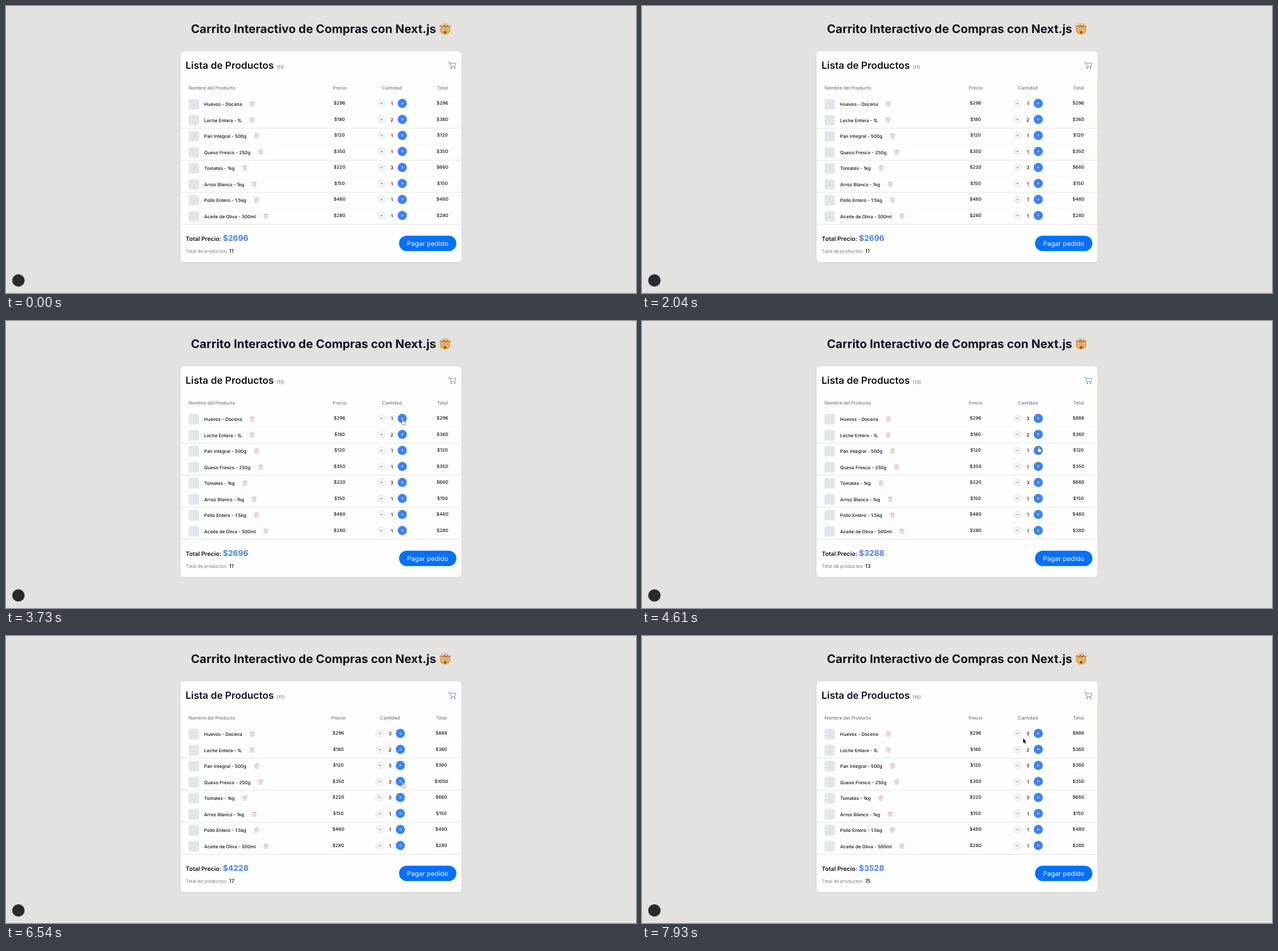
An HTML page with a canvas for the animation above (8 s loop, 1000x457 px).

```html
<!DOCTYPE html>
<html lang="es">
<head>
<meta charset="utf-8">
<title>Carrito</title>
<style>
html, body { margin: 0; width: 100%; height: 100%; overflow: hidden; background: #e3e2e1; }
canvas { display: block; width: 1000px; height: 457px; }
</style>
</head>
<body>
<canvas id="stage"></canvas>
<script>
const W = 1000, H = 457, LOOP = 8000;
const S = W / 1920; // page pixels to stage pixels
const BLUE = '#3b82f6', INK = '#11121f', GRAY = '#737986';
const LEFT = 277, TOP = 72, WIDTH = 446, HEIGHT = 336;
const STEP = 16.5; // from a quantity to its buttons
const BTN = 14 * S;

const dpr = window.devicePixelRatio || 1;
const cv = document.getElementById('stage');
const c = cv.getContext('2d');
cv.width = W * dpr;
cv.height = H * dpr;

const items = [
  { name: 'Huevos - Docena', price: 296, qty: 1 },
  { name: 'Leche Entera - 1L', price: 180, qty: 2 },
  { name: 'Pan Integral - 500g', price: 120, qty: 1 },
  { name: 'Queso Fresco - 250g', price: 350, qty: 1 },
  { name: 'Tomates - 1kg', price: 220, qty: 3 },
  { name: 'Arroz Blanco - 1kg', price: 150, qty: 1 },
  { name: 'Pollo Entero - 1.5kg', price: 480, qty: 1 },
  { name: 'Aceite de Oliva - 500ml', price: 280, qty: 1 }
];
const rowY = i => 155.1 + 25.5 * i;

// Each visit glides to a button, waits, then clicks it twice.
const WAIT = 190, GAP = 240;
const visits = [
  { row: 0, sign: 1, at: 3820, glide: 660 },
  { row: 2, sign: 1, at: 5010, glide: 400 },
  { row: 3, sign: 1, at: 5900, glide: 150 },
  { row: 3, sign: -1, at: 7120, glide: 390 }
];

const move = (start, end, x, y) => ({ start, end, x, y });
const moves = [
  move(630, 1400, 318, 39),
  move(1520, 1900, 327, 37),
  move(2040, 2810, 691.5, 48.5),
  ...visits.map(v => move(v.at - WAIT - v.glide, v.at - WAIT, 612.5 + STEP * v.sign, rowY(v.row) + 2)),
  move(7570, 7930, 605, 163)
];

function cursorAt(t) {
  let x = 330, y = -12;
  for (const m of moves) {
    const k = Math.min(1, Math.max(0, (t - m.start) / (m.end - m.start)));
    const e = 1 - (1 - k) ** 3;
    x += (m.x - x) * e;
    y += (m.y - y) * e;
  }
  return { x, y };
}

function quantities(t) {
  const qty = items.map(it => it.qty);
  for (const v of visits)
    for (const at of [v.at, v.at + GAP]) if (t >= at) qty[v.row] += v.sign;
  return qty;
}

function text(str, x, y, px, weight, color, align = 'left') {
  c.font = `${weight} ${px * S}px Inter, sans-serif`;
  c.textAlign = align;
  c.fillStyle = color;
  c.fillText(str, x, y);
  return c.measureText(str).width;
}

function box(x, y, w, h, r, color) {
  c.fillStyle = color;
  c.beginPath();
  c.roundRect(x, y, w, h, r);
  c.fill();
}

function disc(x, y, r, color) {
  c.fillStyle = color;
  c.beginPath();
  c.arc(x, y, r, 0, Math.PI * 2);
  c.fill();
}

function shape(d, x, y, color, width, fill) {
  const p = new Path2D(d);
  c.save();
  c.translate(x, y);
  c.lineJoin = c.lineCap = 'round';
  c.strokeStyle = color;
  c.lineWidth = width;
  c.stroke(p);
  if (fill) { c.fillStyle = fill; c.fill(p); }
  c.restore();
}

function emoji(x, y) {
  disc(x, y + 1.2, 8.5, '#e9a545');
  for (let i = -2; i <= 2; i++) disc(x + i * 3.2, y - 7.3 + i * i * 0.7, 3, '#e6d5bf');
  shape('M-8 -3 L-6 -4.6 -3.5 -2.8 -1 -5 1.5 -2.8 4 -4.8 6 -2.8 8 -3.5', x, y, '#8d542c', 1.1);
  shape('M-4 -7.5 L-2 -5 M4 -7.5 L2.5 -5 M0 -8 V-6', x, y, '#d9843b', 0.9);
  for (const side of [-3.3, 3.3]) {
    disc(x + side, y + 1.4, 1.8, '#fff4e0');
    disc(x + side, y + 1.4, 0.8, '#40261a');
  }
  disc(x, y + 6, 1.7, '#5d321e');
}

function cart(x, y) {
  shape('M0 0.3 H1.9 L3.7 7.3 H10.4 L11.8 2.1 H2.4', x, y, '#4a80e0', 0.8);
  for (const dx of [4.4, 9.8]) {
    disc(x + dx, y + 9.8, 1.3, '#4a80e0');
    disc(x + dx, y + 9.8, 0.6, '#fff');
  }
}

function trash(x, y) {
  shape('M0 1.5 H7 M2.3 1.5 V0.2 H4.7 V1.5 M0.9 1.5 L1.3 7.4 H5.7 L6.1 1.5 M2.7 3.2 V5.8 M4.3 3.2 V5.8', x, y, '#dc8a80', 0.6);
}

function pointer(x, y, qtyX) {
  const overTitle = x > 294 && x < 684 && y > 25 && y < 47;
  const overButton = items.some((_, i) => [-STEP, STEP].some(
    dx => Math.hypot(x - qtyX - dx, y - rowY(i)) < BTN));
  if (overTitle) {
    shape('M-1.5 -4 Q0 -4 0 -3 V3 Q0 4 -1.5 4 M1.5 -4 Q0 -4 0 -3 M0 3 Q0 4 1.5 4', x, y, '#30303a', 0.7);
  } else if (overButton) {
    shape('M0 0.5 Q0.8 -1 1.6 0.5 V3 L4.4 3.6 Q5.2 4 5 5.2 L4.4 8.2 H0.6 L-1.6 5.2 Q-1.8 4 0 5 Z', x, y, '#1c1c22', 0.9, '#fff');
  } else {
    shape('M0 0 V7.6 L1.7 6.1 2.9 8.8 4.1 8.2 2.9 5.6 H5.2 Z', x, y, '#fff', 0.9, '#111');
  }
}

function productRow(item, i, qty, priceX, qtyX, totalX) {
  const y = rowY(i), x = 314.6;
  box(289.8, y - 7, 32 * S, 32 * S, 2.5, '#e1e6ee');
  const w = text(item.name, x, y + 4, 14, 500, INK);
  trash(x + w + 12.6, y - 2.8);
  text('$' + item.price, priceX, y + 2.1, 14, 500, INK, 'center');
  text('$' + item.price * qty, totalX, y + 2.1, 14, 500, INK, 'center');
  text(qty, qtyX, y + 2.9, 14.5, 500, INK, 'center');
  disc(qtyX - STEP, y, BTN, '#f1f3f6');
  disc(qtyX + STEP, y, BTN, BLUE);
  shape('M-1.3 0 H1.3', qtyX - STEP, y, '#4b5563', 0.7);
  shape('M-1.4 0 H1.4 M0 -1.4 V1.4', qtyX + STEP, y, '#fff', 0.6);
  c.fillStyle = i % 2 ? '#e4e5e8' : '#f8f8f9';
  c.fillRect(LEFT, Math.floor(y + 13.4), WIDTH, 1);
}

function draw(t) {
  const qty = quantities(t);
  const totals = items.map((it, i) => it.price * qty[i]);
  const add = (a, b) => a + b;
  const count = qty.reduce(add), sum = totals.reduce(add);

  // a four-digit total widens the last column
  const wide = Math.max(...totals) > 999 ? 1 : 0;
  const priceX = 529.5 - 2 * wide, qtyX = 612.5 - 3 * wide, totalX = 692.7 - 1.7 * wide;

  c.setTransform(dpr, 0, 0, dpr, 0, 0);
  c.textRendering = 'geometricPrecision';
  c.fillStyle = '#e3e2e1';
  c.fillRect(0, 0, W, H);

  text('Carrito Interactivo de Compras con Next.js', 293.5, 42.8, 36, 700, INK);
  emoji(697, 36);

  c.save();
  c.shadowColor = 'rgba(0,0,0,.14)';
  c.shadowBlur = 2 * dpr;
  c.shadowOffsetY = 0.6 * dpr;
  box(LEFT, TOP, WIDTH, HEIGHT, 5.5, '#fefefe');
  c.restore();

  text('Lista de Productos', 285, 100.2, 30, 600, INK);
  text(`(${count})`, 429.8, 100, 14, 500, GRAY);
  cart(702.3, 89.2);

  text('Nombre del Producto', 289.7, 132.7, 14, 500, GRAY);
  text('Precio', priceX, 132.7, 14, 500, GRAY, 'center');
  text('Cantidad', qtyX, 132.7, 14, 500, GRAY, 'center');
  text('Total', totalX, 132.7, 14, 500, GRAY, 'center');
  items.forEach((it, i) => productRow(it, i, qty[i], priceX, qtyX, totalX));

  text('Total Precio:', 285.3, 373.8, 18, 600, INK);
  text('$' + sum, 344.3, 373.9, 24, 700, '#4a80ee');
  text('Total de productos:', 285.3, 392.5, 14, 400, GRAY);
  text(count, 354.2, 392.6, 16, 500, INK);

  box(623.9, 365.7, 91, 24.6, 12.3, '#0570fb');
  text('Pagar pedido', 669.3, 381.7, 20, 400, '#f2f7ff', 'center');

  disc(19.7, 437, 10, '#55545a');
  disc(19.7, 437, 9.3, '#2a292e');

  const p = cursorAt(t);
  pointer(p.x, p.y, qtyX);
}

function tick() {
  draw(performance.now() % LOOP);
  requestAnimationFrame(tick);
}
tick();
</script>
</body>
</html>
```
